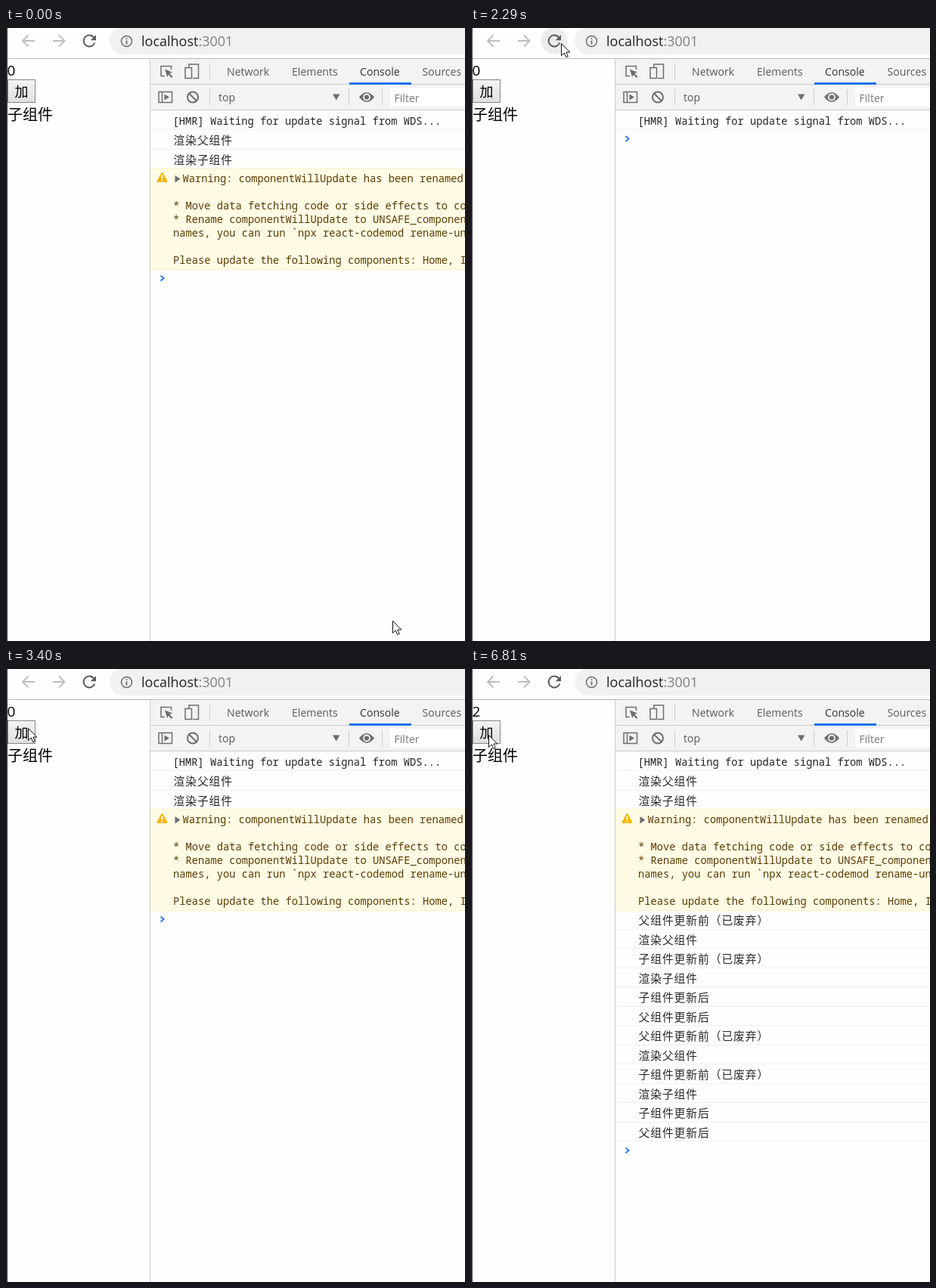
These frames come from a looping animation (607 by 811 pixels, 8000 ms). An HTML page:

```html
<!DOCTYPE html>
<html lang="zh">
<meta charset="utf-8">
<title>Console demo</title>
<style>
  html, body { margin: 0; height: 100%; overflow: hidden; background: #fefefe }
  svg { display: block; width: 607px; height: 811px }
  text { white-space: pre; font: 14.1px "Open Sans", "Noto Sans", sans-serif; fill: #5a5a5a }
  .url { font-size: 18px }
  .page text { font: 20px "Open Sans", "Noto Sans CJK SC", "Noto Sans CJK JP", "Noto Sans CJK", sans-serif; fill: #000 }
  .page .label { font-size: 18px }
  .mono text { font: 13.75px "Noto Sans Mono", "DejaVu Sans Mono", monospace; fill: #222 }
  .mono .cjk { font: 14.8px "Noto Sans CJK SC", "Noto Sans CJK JP", "Noto Sans CJK", sans-serif; letter-spacing: .9px; fill: #2a2a2a }
  .mono .warn text { fill: #5c3c00 }
  .line { fill: none; stroke: #6e6e6e; stroke-width: 1.5 }
  .rule { stroke: #ccc }
  .row { stroke: #f0f0f0 }
</style>
<svg viewBox="0 0 607 811">
  <defs>
    <linearGradient id="up" x2="0" y2="1"><stop stop-color="#f4f4f4"/><stop offset="1" stop-color="#dfdfdf"/></linearGradient>
    <linearGradient id="down" x2="0" y2="1"><stop stop-color="#dadada"/><stop offset="1" stop-color="#e4e4e4"/></linearGradient>
  </defs>
  <rect width="607" height="811" fill="#fefefe"/>

  <!-- browser bar -->
  <rect x="137" y="-1" width="520" height="36" rx="18" fill="#f1f1f2"/>
  <circle id="halo" cx="110" cy="17" r="17.5"/>
  <g class="line" stroke-width="2">
    <path d="M38 17H22.500M29.500 9.500L22 17L29.500 24.500M62 17H77M70 9.500L77.500 17L70 24.500" style="stroke:#bdbdbd;stroke-width:1.8"/>
    <path d="M116 12.300A7.500 7.500 0 1 0 117.200 19.500" style="stroke:#5a5c5e;stroke-width:2"/>
    <circle cx="159.500" cy="17.500" r="7"/>
    <path d="M159.500 16.500V21.500M159.500 13.200V15" style="stroke-width:1.800"/>
  </g>
  <path d="M119 9V16.200H111.800Z" fill="#5a5c5e"/>
  <text class="url" x="179" y="23.500" style="fill:#222">localhost<tspan fill="#808080">:3001</tspan></text>
  <path class="rule" d="M0 40.500H607" style="stroke:#b8b8b8"/>

  <!-- page -->
  <g class="page">
    <text id="count" x="1.500" y="63" style="font-size:19px"></text>
    <rect id="button" x="2.500" y="68.500" width="36" height="30" stroke="#858585"/>
    <text class="label" x="11.500" y="91">加</text>
    <text x="2" y="121.500">子组件</text>
  </g>

  <!-- developer tools -->
  <rect x="191" y="41" width="416" height="67" fill="#f3f3f3"/>
  <rect x="508" y="79" width="99" height="25" fill="#fff"/>
  <path class="rule" d="M190.500 41V811M191 74.500H607M191 108.500H607M269.500 47V68M269.500 81V102M453.500 81V102M497.500 81V102"/>
  <rect x="454" y="72" width="82" height="3" fill="#1a73e8"/>
  <g class="line">
    <path d="M210 63.500H205V50.500H218.500V55"/>
    <path d="M242 52V48H254.500V66.500H247M237 52.500H245.500V66.500H237Z"/>
    <path d="M202 84.500H219.500V98.500H202ZM206.500 84V99"/>
    <g style="stroke-width:2"><circle cx="247" cy="91.500" r="7"/><path d="M242 86.500L252 96.500"/></g>
  </g>
  <g fill="#6e6e6e">
    <path d="M210 54.500L220 58.500L216.500 60L220.500 64.500L218.800 66L215 61.800L213.200 65Z"/>
    <path d="M209.500 87.500V95.500L216 91.500ZM432 87.500H441.500L436.700 95.500Z"/>
    <path d="M467 91.500Q477 78.500 487 91.500Q477 104.500 467 91.500Z"/>
    <circle cx="477" cy="91.500" r="4" fill="none" stroke="#f3f3f3" stroke-width="1.800"/>
  </g>
  <text x="292" y="63">Network</text>
  <text x="378" y="63">Elements</text>
  <text x="468" y="63" style="fill:#333">Console</text>
  <text x="550.500" y="63">Sources</text>
  <text x="281" y="97">top</text>
  <text x="513.500" y="98" style="fill:#777">Filter</text>

  <g class="mono">
    <text x="220.500" y="128">[HMR] Waiting for update signal from WDS...</text>
    <path class="row" d="M191 134H607"/>
    <g id="first">
      <g id="mount"></g>
      <g class="warn">
        <rect x="191" y="185" width="416" height="135" fill="#fffbe5"/>
        <path d="M191 185.500H607M191 319.500H607" stroke="#fff3c0"/>
        <path d="M206.500 192L212.500 203H200.500Z" fill="#f2b600" stroke="#f2b600" stroke-width="2" stroke-linejoin="round"/>
        <path d="M206.500 194.500V199.500M206.500 201V203" stroke="#fff" stroke-width="1.800"/>
        <path d="M223.500 195V204.500L230.500 199.700Z" fill="#6e6e6e"/>
        <text x="233.500" y="204">Warning: componentWillUpdate has been renamed,</text>
        <text x="221" y="240">* Move data fetching code or side effects to co</text>
        <text x="221" y="258">* Rename componentWillUpdate to UNSAFE_componen</text>
        <text x="221" y="276">names, you can run `npx react-codemod rename-un</text>
        <text x="221" y="312">Please update the following components: Home, I</text>
      </g>
    </g>
    <g id="update1"></g>
    <g id="update2"></g>
  </g>
  <path id="prompt" d="M204.500 -3.500L208.700 0L204.500 3.500" fill="none" stroke="#367cf1" stroke-width="2"/>
  <rect width="2" height="811" fill="#333"/>
  <path id="cursor" d="M.5 .5V16.500L4.300 13L6.800 18.700L9.300 17.600L6.900 12H11.800Z" fill="#fff" stroke="#111"/>
</svg>
<script>
const $ = id => document.getElementById(id);
const ROW = 25.5, LOG_END = 319.5, LOOP = 8000;
const updateLog = ['父组件更新前（已废弃）', '渲染父组件', '子组件更新前（已废弃）', '渲染子组件', '子组件更新后', '父组件更新后'];

function addRows(id, top, lines) {
  $(id).innerHTML = lines.map((line, i) => {
    const y = top + i * ROW;
    return `<text class="cjk" x="221.5" y="${y + 18.5}">${line}</text>
      <path class="row" d="M191 ${Math.floor(y + ROW) - .5}H607"/>`;
  }).join('');
}
addRows('mount', 135.5, ['渲染父组件', '渲染子组件']);
addRows('update1', LOG_END, updateLog);
addRows('update2', LOG_END + 6 * ROW, updateLog);

// Each track lists [start time, ...values]; values hold until the next entry.
const pointer = [
  [0, 511, 784], [150, 505, 779], [300, 533, 748], [420, 454, 692], [540, 472, 656],
  [690, 385, 420], [810, 269, 192], [960, 153, 50], [1110, 139, 31], [1360, 127, 24],
  [1500, 119, 20], [2970, 88, 29], [3100, 54, 39], [3250, 40, 60], [3400, 29, 78], [3520, 23, 87]
];
const halo = [[0, 'none'], [1500, '#f6f6f6'], [1750, '#ececec'], [1870, '#dfdfdf'], [2290, '#ececec'], [3250, 'none']];
const button = [[0, 'up'], [3800, 'down'], [3920, 'up'], [6660, 'down'], [6810, 'up']];
const clicks = [[0, 0], [3920, 1], [6810, 2]];
const at = (track, t) => track.findLast(([start]) => start <= t).slice(1);
const show = (id, on) => $(id).style.display = on ? '' : 'none';

function draw(now) {
  const t = now % LOOP;
  const [count] = at(clicks, t);
  const cleared = t >= 2290 && t < 2420;
  $('cursor').setAttribute('transform', `translate(${at(pointer, t)})`);
  $('halo').setAttribute('fill', at(halo, t)[0]);
  $('button').setAttribute('fill', `url(#${at(button, t)[0]})`);
  $('count').textContent = count;
  show('first', !cleared);
  show('update1', count > 0);
  show('update2', count > 1);
  const promptY = cleared ? 146.5 : LOG_END + 11.5 + count * 6 * ROW;
  $('prompt').setAttribute('transform', `translate(0 ${promptY})`);
}

const begin = performance.now();
function tick() {
  draw(performance.now() - begin);
  requestAnimationFrame(tick);
}
tick();
</script>
</html>
```
